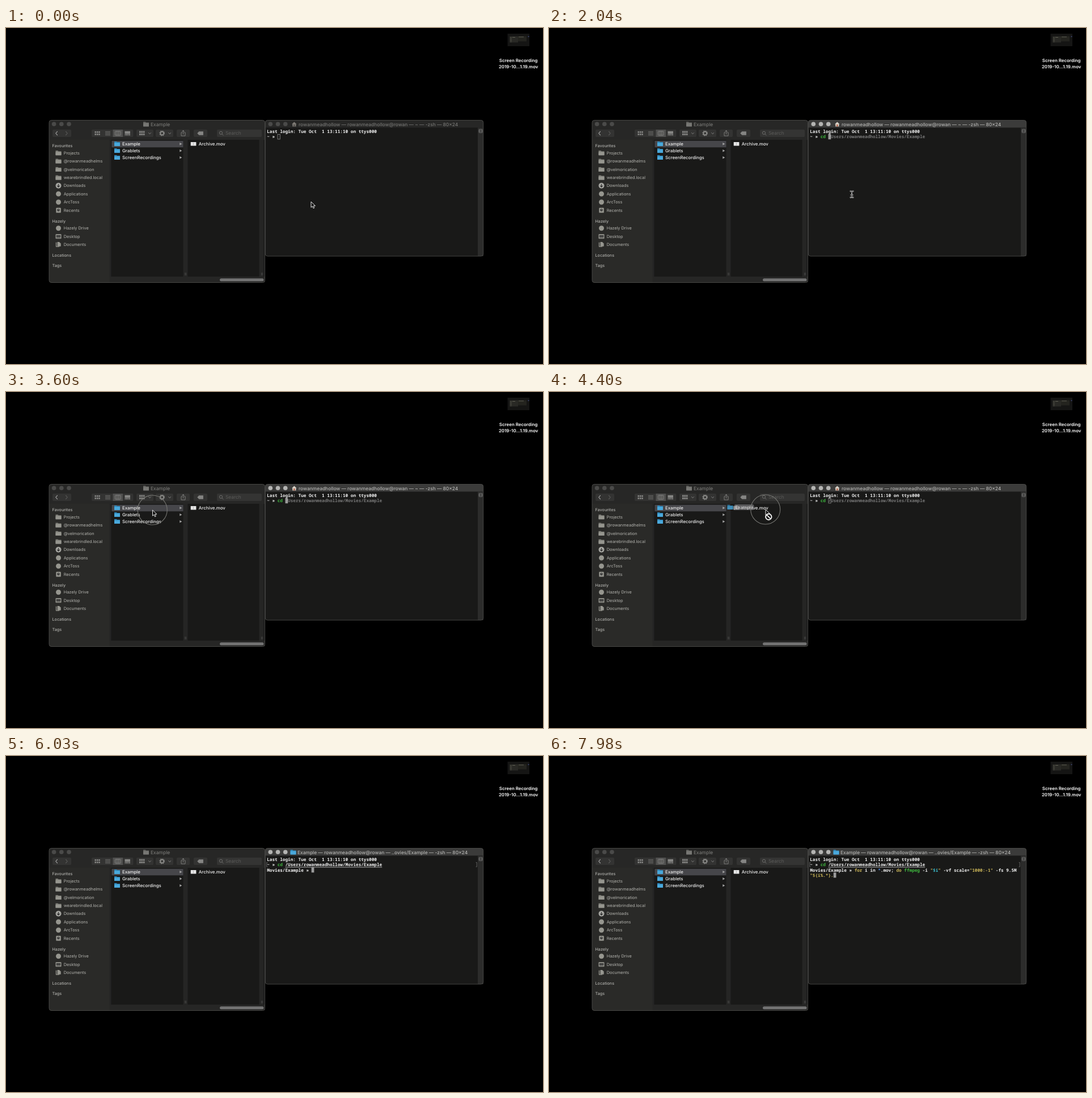
Animation, 947 px wide and 592 px high, one loop 8 s. Source, as an HTML page:

```html
<!DOCTYPE html>
<html lang="en">
<head>
<meta charset="utf-8">
<title>Desktop recording</title>
<style>
html, body { margin: 0; width: 100%; height: 100%; overflow: hidden; background: #000; }
svg { display: block; width: 100vw; height: 100vh; }
text { font-family: Inter, "Open Sans", sans-serif; white-space: pre; text-rendering: geometricPrecision; }
.mono { font-family: "Noto Sans Mono", "DejaVu Sans Mono", monospace; font-size: 7.69px; font-weight: 600; }
</style>
</head>
<body>
<svg id="stage" viewBox="0 0 947 592"></svg>
<script>
const LOOP = 8000;
const USER = 'rowanmeadhollow', HOST = 'rowan';
const PATH = `/Users/${USER}/Movies/Example`;
const WHITE = '#f0f0f0', GREEN = '#3fb93f', YELLOW = '#c9b458', BLUE = '#4a86e0', CYAN = '#3cc3d6', DIM = '#777';
const CELL = 4.614, LEFT = 460.2, LINE = 9.1, TOP = 185.3;

// Shape helpers returning markup
const rect = (x, y, w, h, fill, r = 0, extra = '') =>
  `<rect x="${x}" y="${y}" width="${w}" height="${h}" rx="${r}" fill="${fill}" ${extra}/>`;
const circle = (x, y, r, fill, extra = '') => `<circle cx="${x}" cy="${y}" r="${r}" fill="${fill}" ${extra}/>`;
const line = (d, color, w = 1) =>
  `<path d="${d}" fill="none" stroke="${color}" stroke-width="${w}" stroke-linecap="round" stroke-linejoin="round"/>`;
const shape = (d, fill) => `<path d="${d}" fill="${fill}"/>`;
const esc = s => s.replace(/&/g, '&amp;').replace(/</g, '&lt;');
const label = (x, y, s, size, fill, weight = 500, extra = '') =>
  `<text x="${x}" y="${y}" font-size="${size}" font-weight="${weight}" fill="${fill}" ${extra}>${esc(s)}</text>`;
const folder = (x, y, color, tab, w = 10) =>
  shape(`M${x} ${y}h${w * .4}l1 1.2h${w * .6 - 1}v7h${-w}z`, tab) + rect(x, y + 2.4, w, 5.8, color, .6);
const lights = (x, color) => [0, 13.2, 26.4].map(d => circle(x + d, 169.2, 3.8, color)).join('');

function desktopIcon() {
  let s = rect(884.5, 10, 38.5, 22, '#151514');
  s += rect(888, 14.5, 15, 11, '#292925') + rect(903, 14.5, 15, 9, '#24241f');
  for (let i = 0; i < 6; i++) s += rect(889, 16 + i * 1.6, 3, .6, '#55554c');
  s += rect(904, 15.5, 9, .7, '#77776a') + rect(893, 16, 5, .7, '#77776a') + rect(920.5, 14.5, 2, 1.2, '#4a5690');
  return s + label(903.7, 60.2, 'Screen Recording', 7.9, '#fff', 600, 'text-anchor="middle"')
    + label(903.7, 70.6, '2019-10...1.19.mov', 7.9, '#fff', 600, 'text-anchor="middle"');
}

function toolbar() {
  const btn = '#333332', ink = '#858583';
  let s = rect(82, 179, 33, 13, btn, 2) + rect(151, 179, 73.5, 13, btn, 2) + rect(188.5, 179, 17.5, 13, '#50504f');
  for (const [x, w] of [[230, 30], [264, 31], [301, 23], [331, 24]]) s += rect(x, 179, w, 13, btn, 2);
  s += rect(372, 179, 79, 13, '#343433', 2);
  s += line('M90.5 182.3l-2.8 3.2 2.8 3.2', '#aaa', 1.1) + line('M105.5 182.3l2.8 3.2-2.8 3.2', '#5c5c5a', 1.1);
  for (let i = 0; i < 6; i++) s += rect(156.5 + i % 3 * 3.4, 182 + (i / 3 | 0) * 4, 2.5, 2.8, ink);
  for (let i = 0; i < 4; i++) s += rect(175, 182 + i * 2.1, 9, .9, '#6f6f6d');
  s += rect(192.5, 182, 9.5, 7, 'none', .5, 'stroke="#8c8c8a" stroke-width=".8"') + line('M195.7 182v7M198.9 182v7', '#8c8c8a', .8);
  s += rect(209.5, 181.8, 9.5, 4.8, ink);
  for (let i = 0; i < 4; i++) s += rect(209.5 + i * 2.5, 187.3, 2, 1.9, ink);
  for (let i = 0; i < 6; i++) s += rect(235 + i % 3 * 3.4, 181.5 + (i / 3 | 0) * 4.3, 2.7, 3.2, ink);
  s += line('M251.5 184.7l2 2 2-2M286.7 184.7l2 2 2-2', ink);
  s += circle(275.2, 185.5, 2.9, 'none', `stroke="${ink}" stroke-width="2"`)
    + circle(275.2, 185.5, 4.3, 'none', `stroke="${ink}" stroke-width="1.2" stroke-dasharray="1.7 1.68"`);
  s += line('M310.5 184h-1.5v6h7v-6h-1.5M312.5 187v-6.5m-1.8 1.7l1.8-1.8 1.8 1.8', ink, .9);
  s += shape('M337.3 185.5l3-3.2h7.6v6.4h-7.6z', ink);
  s += circle(379, 184.8, 2.6, 'none', 'stroke="#6f6f6d"') + line('M381 186.8l2.2 2.2', '#6f6f6d');
  return s + label(387, 188.4, 'Search', 8.4, '#5c5c5a', 400);
}

function sideIcon(kind, y) {
  const c = '#96968f', x = 92.5;
  if (kind === 'dot') return circle(x, y, 4.5, c);
  if (kind === 'folder') return folder(87.5, y - 4, c, '#7d7d77');
  if (kind === 'down') return circle(x, y, 5, '#a5a5a0') + line(`M${x} ${y - 2.6}v5m-2-2l2 2 2-2`, '#222', 1.1);
  if (kind === 'desk') return rect(87.5, y - 4, 10, 8, c, .8) + rect(88.7, y - 2, 7.6, 3, '#333') + rect(89, y + 2, 7, .8, '#333');
  if (kind === 'docs') return line(`M88.5 ${y - 3.5}v7h5`, c, 1.3) + shape(`M90.5 ${y - 4.8}h3.4l2.8 2.8v5h-6.2z`, c);
  return rect(88.3, y - 4.3, 8.5, 8.8, c, 1.2) + circle(x, y - .4, 2.3, '#333') + line(`M${x} ${y - 1.7}v1.4h1`, c, .6);
}

function finder() {
  let s = rect(76, 162.5, 380.5, 286, '#191918', 4) + shape('M76 197V166q0-3.5 4-3.5H452.5q4 0 4 3.5V197z', '#272726');
  s += shape('M76 197h107v251.5H80q-4 0-4-4z', '#2a2a28');
  for (const x of [182.5, 312.5, 446.5]) s += rect(x, 197, x < 200 ? 3 : 8, 241, '#252524');
  s += rect(182.5, 438, 274, 10, '#262625') + rect(377, 441.3, 77.5, 5, '#737373', 2.5);
  s += line('M315.7 431.5v4M317.5 431.5v4M450.5 431.5v4M452.3 431.5v4', '#555', .7);
  s += lights(84.6, '#4a4a49') + folder(242, 165.2, '#777774', '#62625f') + label(255, 172.5, 'Example', 8.5, '#82827f', 400);
  s += toolbar();
  const heads = [['Favourites', 209.8], ['Hazely', 343], ['Locations', 403.3], ['Tags', 420.5]];
  for (const [name, y] of heads) s += label(81.5, y, name, 7.2, '#b0b0ac', 500);
  const items = [
    ['Projects', 'folder', 220], ['@rowanmeadhelms', 'folder', 234.4], ['@velmorication', 'folder', 248.9],
    ['wearebrindled.local', 'folder', 263.4], ['Downloads', 'down', 277.8], ['Applications', 'dot', 292.2],
    ['ArcToss', 'dot', 306.7], ['Recents', 'clock', 321.1], ['Hazely Drive', 'dot', 352.7],
    ['Desktop', 'desk', 367.2], ['Documents', 'docs', 381.7]];
  for (const [name, kind, y] of items) s += sideIcon(kind, y) + label(101.7, y + 2.6, name, 7.35, '#b3b3ae', 400);
  s += rect(186.5, 198.7, 126, 11.6, '#46464a');
  ['Example', 'Grablets', 'ScreenRecordings'].forEach((name, i) => {
    const y = 204.2 + i * 12;
    s += folder(191, y - 4.3, '#4aa9dc', '#2f86b8') + label(205, y + 2.8, name, 7.85, WHITE);
    s += shape(`M306.3 ${y - 2.3}l4 2.3-4 2.3z`, '#a5a5a5');
  });
  s += rect(325.7, 201, 9.7, 6.5, '#e6e6e6', .5) + rect(330.2, 202, .8, 4.5, '#aaa') + label(339.8, 207, 'Archive.mov', 7.85, WHITE);
  return s + rect(76, 162.5, 380.5, 286, 'none', 4, 'stroke="#4b4b49" stroke-width=".9"');
}

function terminal() {
  return rect(457.3, 162.5, 384.4, 239.5, '#191918', 4)
    + '<g id="bar"></g>'
    + rect(832, 175.5, 9.7, 226.5, '#2c2c2b')
    + rect(834.3, 178.7, 5.6, 5.6, 'none', .5, 'stroke="#909090" stroke-width=".8"') + line('M834.5 181.5h5', '#909090', .8)
    + rect(457.3, 162.5, 384.4, 239.5, 'none', 4, 'stroke="#4b4b49" stroke-width=".9"')
    + '<g id="rows"></g>';
}

const stage = document.getElementById('stage');
stage.innerHTML = rect(0, 0, 947, 592, '#000') + desktopIcon() + finder() + terminal() + '<g id="top"></g>';
const bar = document.getElementById('bar'), rows = document.getElementById('rows'), overlay = document.getElementById('top');
const put = (node, html) => { if (node.last !== html) node.innerHTML = node.last = html; };

function titleBar(t) {
  const active = t >= 420, moved = t >= 5800;
  const ink = active ? '#b5b5b3' : '#747472';
  let s = shape('M457.3 175.5V166.5q0-4 4-4H837.7q4 0 4 4V175.5z', active ? '#3b3b3a' : '#272726');
  s += lights(466.3, active ? '#b4b4b2' : '#4a4a49');
  if (moved) return s + folder(501.5, 165.2, '#4aa9dc', '#2f86b8')
    + label(514, 172.6, `Example — ${USER}@${HOST} — ..ovies/Example — -zsh — 80×24`, 8.4, ink, 500);
  s += shape('M504 169.5l4.3-4 4.3 4h-1.2v4h-6.2v-4z', active ? '#d6cfc4' : '#7d7a75') + rect(507.2, 170, 2.2, 3.5, active ? '#b0553c' : '#4f4a46');
  return s + label(516, 172.6, `${USER} — ${USER}@${HOST} — ~ — -zsh — 80×24`, 8.4, ink, 500);
}

// Coloured runs on one terminal row, cut off after max characters
function runs(row, col, parts, max = 999) {
  let s = '';
  const y = TOP + row * LINE;
  for (const [str, fill, under] of parts) {
    const cut = str.slice(0, max), x = LEFT + col * CELL;
    max -= cut.length;
    if (cut.trim()) s += `<text class="mono" x="${x}" y="${y}" fill="${fill}">${esc(cut)}</text>`;
    if (under && cut) s += rect(x, y + 1.2, cut.length * CELL, .7, fill);
    col += str.length;
    if (max <= 0) break;
  }
  return s;
}
function caret(row, col, hollow) {
  const x = LEFT + col * CELL, y = TOP + row * LINE - 7.3;
  return hollow ? rect(x + .4, y + .4, 4.2, 8.4, 'none', 0, 'stroke="#8e8e8e" stroke-width=".8"') : rect(x, y, 4.7, 9.1, '#9b9b9b');
}

const COMMAND = [['for', YELLOW], [' i in ', WHITE], ['*', BLUE], ['.mov; ', WHITE], ['do', YELLOW], [' ', WHITE], ['ffmpeg', GREEN],
  [' -i ', WHITE], ['"', YELLOW], ['$i', CYAN], ['"', YELLOW], [' -vf scale=', WHITE], ['"1000:-1"', YELLOW], [' -fs 9.5M ', WHITE]];
const TAIL = [['"${i%.*}.', YELLOW]];

function shell(t) {
  let s = runs(0, 0, [['Last login: Tue Oct  1 13:11:10 on ttys000', WHITE]]) + runs(1, 0, [['~ » ', WHITE]]);
  if (t < 4960) {
    const n = [1120, 1280, 1450].filter(k => t >= k).length;
    const hollow = t < 420 || (t >= 3700 && t < 4960);
    if (n) s += runs(1, 4, [['cd ', GREEN]], n) + runs(1, 4 + n, [['cd '.slice(n) + PATH, DIM]]);
    return s + caret(1, 4 + n, hollow);
  }
  if (t < 5300) {
    const n = Math.min(PATH.length, Math.floor((t - 4960) / 150 * 34.2));
    return s + runs(1, 4, [[PATH, WHITE, true]], n) + caret(1, 4 + n);
  }
  const n = Math.min(3, 1 + Math.floor((t - 5300) / 80));
  s += runs(1, 4, [['cd ', GREEN]], n) + runs(1, 4 + n, [[PATH, WHITE, true]]);
  if (t < 5700) return s + caret(1, 4 + n + PATH.length);
  s += line('M461 187.6h-1.3v7.6h1.3M829 187.6h1.3v7.6h-1.3', '#808080', .7);
  s += runs(2, 0, [['Movies/Example » ', WHITE]]);
  const typed = Math.max(0, Math.min(72, Math.floor((t - 7185) / 795 * 72)));
  if (typed) s += runs(2, 17, COMMAND, typed);
  if (typed > 63) s += runs(3, 0, TAIL, typed - 63);
  return s + (typed < 63 ? caret(2, 17 + typed) : caret(3, typed - 63));
}

// Pointer stops: time, x, y
const STOPS = [[0, 538, 306], [120, 538, 306], [420, 534, 293], [2490, 534, 293], [2740, 276, 258], [2800, 276, 258], [3080, 230, 206],
  [3280, 258.5, 208], [3700, 258.5, 208], [4040, 292, 208], [4140, 292, 208], [4400, 382, 207], [4520, 426, 208], [4710, 426, 208], [4930, 572, 229], [LOOP, 572, 229]];
function pointerAt(t) {
  const i = STOPS.findIndex(p => p[0] > t);
  const [t0, x0, y0] = STOPS[i - 1], [t1, x1, y1] = STOPS[i];
  const u = (t - t0) / (t1 - t0), e = u * u * (3 - 2 * u);
  return [x0 + (x1 - x0) * e, y0 + (y1 - y0) * e];
}

function pointer(t) {
  if ((t >= 1120 && t < 1690) || t >= 5300) return '';
  const [x, y] = pointerAt(t), held = t >= 3310 && t < 4960, drag = t >= 3700 && t < 4960;
  let s = '';
  if (drag) {
    const dx = x - 258.5, dy = y - 208;
    s += `<g transform="translate(${dx} ${dy})" opacity=".8">` + rect(203, 199, 35, 10, '#6b6b6e', 3)
      + folder(191, 199.7, '#4aa9dc', '#2f86b8') + label(205, 206.8, 'Example', 7.85, WHITE) + '</g>';
  }
  if (held) s += circle(x - .3, y, 26, 'none', 'stroke="#777773" stroke-width="1.1"');
  const overShell = x > 457 && !drag && t >= 420;
  if (overShell) {
    const beam = `M${x - 2.5} ${y - 5.5}q2.5 0 2.5 1.8q0-1.8 2.5-1.8M${x} ${y - 4}v8M${x - 2.5} ${y + 5.5}q2.5 0 2.5-1.8q0 1.8 2.5 1.8M${x - 1.5} ${y + 1.3}h3`;
    return s + line(beam, '#e8e8e8', 2) + line(beam, '#111', .7);
  }
  s += `<path d="M${x} ${y}v10.2l2.4-2.2 1.6 3.7 1.8-.8-1.6-3.6h3.2z" fill="#111" stroke="#f2f2f2" stroke-width=".95" stroke-linejoin="round"/>`;
  if (drag && x < 457) s += circle(x + 5.3, y + 13, 5.2, '#111', 'stroke="#f4f4f4" stroke-width="1.9"')
    + line(`M${x + 2} ${y + 9.6}l6.6 6.8`, '#f4f4f4', 1.8);
  return s;
}

function draw(t) {
  put(bar, titleBar(t));
  put(rows, shell(t));
  put(overlay, pointer(t));
}

const start = performance.now();
function tick() {
  draw((performance.now() - start) % LOOP);
  requestAnimationFrame(tick);
}
draw(0);
requestAnimationFrame(tick);
</script>
</body>
</html>
```
